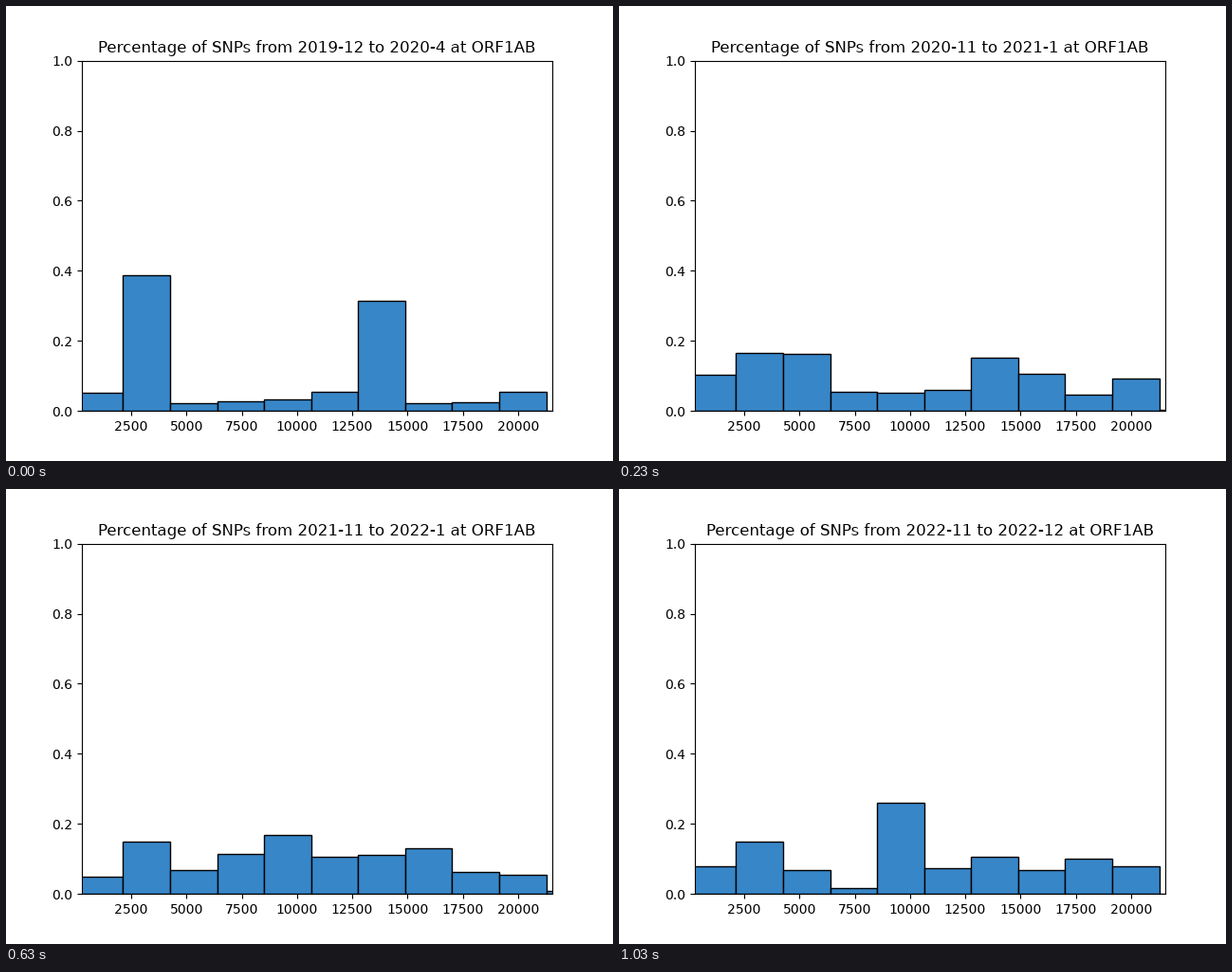
A matplotlib script for the animation above (1130 ms loop, 640 px wide and 480 px high).

```python
import matplotlib.pyplot as plt
import numpy as np
from matplotlib.animation import FuncAnimation

START, END = 266, 21555
WIDTH = 2128       # bases per bin
LAST = 11          # index of the final period
STEP = 10          # ms per frame
LOOP = 1130        # ms per loop

plt.rcParams["text.hinting"] = "native"


def bump(t, centre, width=0.5):
    return np.exp(-((t - centre) / width) ** 2)


def rise(t, centre, steep=8):
    return 1 / (1 + np.exp(-steep * (t - centre)))


def shares(t):
    """Share of SNPs in each bin, as waves that come and go by period."""
    start = np.exp(-2 * t)
    second, third = bump(t, 2), bump(t, 3)
    late = rise(t, 7.5)
    mid = rise(t, 3.1) - late
    age = max(t - 8, 0)
    return [
        .05 + .145 * bump(t, 2, 1) + .01 * age,
        .15 + .238 * start + .015 * (second + third),
        .022 - .011 * second + .128 * third + .045 * (mid + late),
        .017 + .01 * start + .318 * second + .1 * mid,
        .033 * start + .165 * mid + late * (.33 - .023 * age),
        .008 + .047 * start + .02 * third + .1 * mid + .017 * late + .016 * age,
        .105 + .21 * np.exp(-t / 2),
        .022 + .05 * third + .11 * mid + .045 * late,
        .025 + .04 * second + .02 * third + .075 * rise(t, 7, 2),
        .055 - .04 * second + .037 * third + .025 * late,
        .01 * mid,
    ]


def month(n):
    """Label for n months after January 2020."""
    return f"{2020 + n // 12}-{n % 12 + 1}"


def title(period):
    first = 3 * period + 1 if period else -1
    last = min(3 * period + 3, 35)
    return f"Percentage of SNPs from {month(first)} to {month(last)} at ORF1AB"


fig, ax = plt.subplots(figsize=(6.4, 4.8), dpi=100)
bars = ax.bar(np.arange(11) * WIDTH, shares(0), WIDTH, align="edge",
              color="#3786c8", edgecolor="black")
ax.set_xlim(START, END)
ax.set_ylim(0, 1)
heading = ax.set_title(title(0))


def update(frame):
    # The opening period lasts 30 ms, every later one 100 ms.
    period = min((frame * STEP + 70) // 100, LAST)
    for bar, share in zip(bars, shares(period)):
        bar.set_height(share)
    heading.set_text(title(period))
    return [*bars, heading]


anim = FuncAnimation(fig, update, frames=LOOP // STEP, interval=STEP,
                     repeat=True, repeat_delay=0, blit=False)
plt.show()
```
